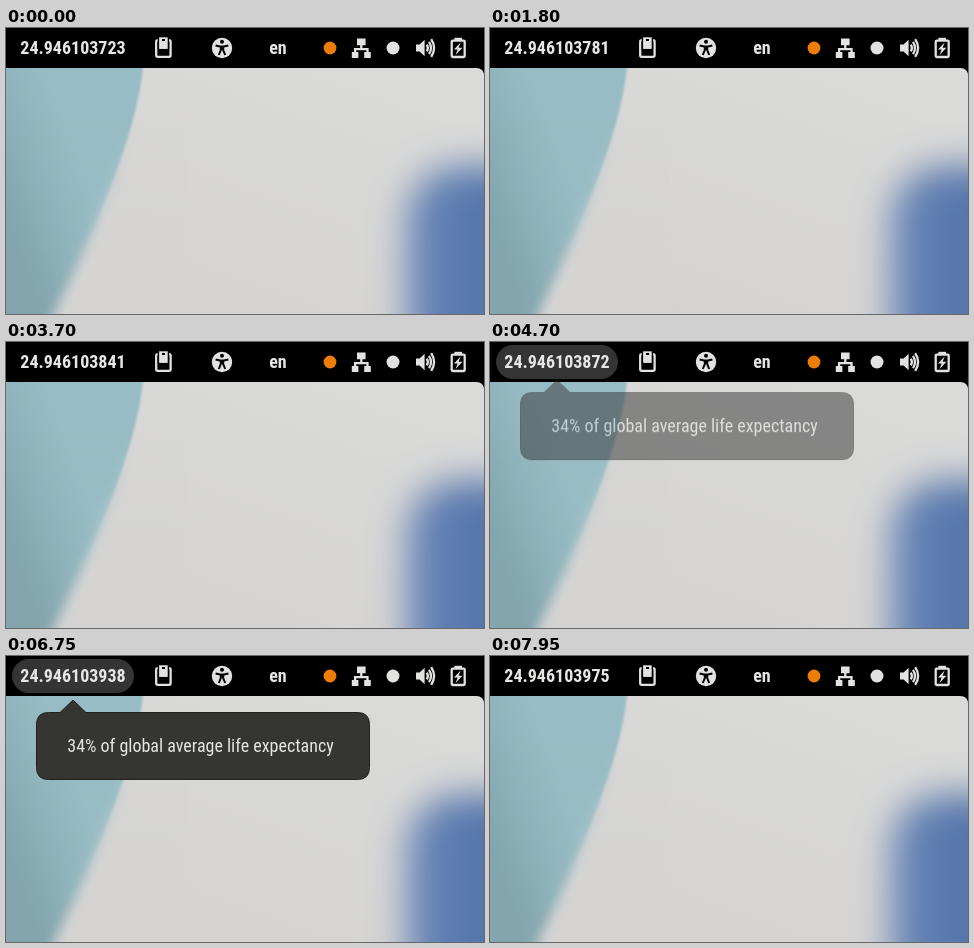
These frames come from a looping animation (478 by 286 pixels, 8000 ms). An HTML page:

```html
<!DOCTYPE html>
<html lang="en">
<head>
<meta charset="utf-8">
<title>Panel age counter</title>
<style>
  html, body { margin: 0; width: 100%; height: 100%; overflow: hidden; background: #000; }
  svg { display: block; width: 478px; height: 286px; }
  text {
    font: 18px "Roboto Condensed", Roboto, sans-serif;
    font-stretch: 75%;
    text-anchor: middle;
    fill: #e6e6e5;
  }
  .bold { font-weight: 700; }
  .icons { fill: #e2e2e1; }
  .line { fill: none; stroke: #e2e2e1; stroke-width: 2.3; }
  .cut { fill: none; stroke: #000; }
  #hover { opacity: 0; animation: hover 8s linear infinite; }
  #popup { opacity: 0; animation: popup 8s linear infinite; }
  @keyframes hover {
    0%, 49.375% { opacity: 0; }
    51.25%, 91.25% { opacity: 1; }
    93.125%, 100% { opacity: 0; }
  }
  @keyframes popup {
    0%, 57.8125% { opacity: 0; transform: translateY(-12px); }
    59.6875%, 89.375% { opacity: 1; transform: none; }
    91.25%, 100% { opacity: 0; transform: translateY(-12px); }
  }
</style>
</head>
<body>
<svg viewBox="0 0 478 286">
  <defs>
    <linearGradient id="paper" x1="1" y1="0" x2="0.3" y2="1">
      <stop offset="0" stop-color="#dbdbda"/>
      <stop offset="1" stop-color="#d4d3d2"/>
    </linearGradient>
    <linearGradient id="teal" gradientUnits="userSpaceOnUse" x1="0" y1="180" x2="80" y2="150">
      <stop offset="0" stop-color="#84a5ae"/>
      <stop offset="0.5" stop-color="#8fb3bc"/>
      <stop offset="1" stop-color="#98bcc5"/>
    </linearGradient>
    <linearGradient id="blue" gradientUnits="userSpaceOnUse" x1="400" y1="0" x2="478" y2="0">
      <stop offset="0" stop-color="#6b88b9"/>
      <stop offset="1" stop-color="#5474aa"/>
    </linearGradient>
    <linearGradient id="fade" x1="0" y1="0" x2="0" y2="1">
      <stop offset="0.2" stop-color="#000"/>
      <stop offset="0.75" stop-color="#fff"/>
    </linearGradient>
    <mask id="lower"><rect y="40" width="478" height="246" fill="url(#fade)"/></mask>
    <filter id="sharp" x="-20%" y="-20%" width="140%" height="140%"><feGaussianBlur stdDeviation="1.3"/></filter>
    <filter id="soft" x="-20%" y="-20%" width="140%" height="140%"><feGaussianBlur stdDeviation="6"/></filter>
    <filter id="haze" x="-50%" y="-50%" width="200%" height="200%"><feGaussianBlur stdDeviation="18"/></filter>
    <clipPath id="desk"><path d="M0 40H470Q478 40 478 48V286H0Z"/></clipPath>
    <path id="leaf" d="M-40 0H140Q139 30 137 40C130 108 90 200 48 286L30 330H-40Z"/>
  </defs>

  <rect width="478" height="286"/>
  <g clip-path="url(#desk)">
    <rect y="40" width="478" height="246" fill="url(#paper)"/>
    <use href="#leaf" fill="url(#teal)" filter="url(#sharp)"/>
    <g mask="url(#lower)">
      <rect y="40" width="180" height="246" fill="#d5d4d3"/>
      <use href="#leaf" fill="url(#teal)" filter="url(#soft)"/>
    </g>
    <rect x="401" y="139" width="190" height="260" rx="52" fill="url(#blue)" filter="url(#haze)"/>
  </g>

  <rect id="hover" x="6" y="3" width="122" height="34" rx="17" fill="#343434"/>
  <text id="age" class="bold" x="67" y="26">24.946103723</text>
  <text class="bold" x="272" y="26">en</text>

  <g class="icons">
    <!-- clipboard -->
    <rect class="line" x="150.2" y="12.2" width="14.4" height="16.6" rx="1.6"/>
    <rect x="152.4" y="8.6" width="10" height="13" stroke="#000" stroke-width="1.4"/>
    <rect x="154" y="10" width="6.8" height="10.6" rx="1"/>
    <rect x="156" y="11" width="3" height="2" fill="#000"/>
    <!-- accessibility -->
    <circle cx="216" cy="20" r="10.2"/>
    <circle cx="216" cy="13.7" r="2" fill="#000"/>
    <path class="cut" d="M209.6 17.4L214 18.4H218L222.4 17.4" stroke-width="2"/>
    <path class="cut" d="M216 18V22M214.8 18.5V22L212.8 27M217.2 18.5V22L219.2 27" stroke-width="2"/>
    <circle cx="324" cy="20" r="6.4" fill="#ed7d04"/>
    <!-- wired network -->
    <path d="M351 10.6h8.6v6.6h-8.6zM345.8 24h6.6v6h-6.6zM358.2 24h6.6v6h-6.6z"/>
    <path class="line" d="M355.3 17V21.2M349.1 25V21.2H361.5V25" stroke-width="1.8"/>
    <circle cx="387" cy="20" r="6.5"/>
    <!-- volume -->
    <path d="M410 16.6h3.6l5-4.8v16.4l-5-4.8h-3.6z"/>
    <path class="line" d="M420.8 16.6Q423 20 420.8 23.4M423 13.8Q427 20 423 26.2M425.2 11.2Q431 20 425.2 28.8" stroke-width="1.8"/>
    <!-- battery -->
    <path d="M448.4 9.8h7.6v3h-7.6z"/>
    <rect class="line" x="445.7" y="12.6" width="13" height="16.4" rx="1"/>
    <path d="M454.6 14.4L448 21.4h3.6L449.6 27l6.8-7.2h-3.8z"/>
  </g>

  <g id="popup">
    <path d="M42.5 56.5H54L67 44L80 56.5H351.5Q363.5 56.5 363.5 68.5V111.5Q363.5 123.5 351.5 123.5H42.5Q30.5 123.5 30.5 111.5V68.5Q30.5 56.5 42.5 56.5Z"
      fill="#353534" stroke="#20201f"/>
    <text x="194.5" y="96">34% of global average life expectancy</text>
  </g>
</svg>
<script>
  const LOOP = 8000, STEP = 50;
  // [time in ms, last three digits]; the clock drifts slightly between them
  const ticks = [[0, 723], [950, 754], [2700, 809], [3700, 841], [4700, 872], [6750, 938], [7950, 975], [8000, 977]];
  const age = document.getElementById('age');
  let start;

  function digitsAt(time) {
    const i = ticks.findIndex(([t]) => t > time);
    const [t0, v0] = ticks[i - 1], [t1, v1] = ticks[i];
    return Math.round(v0 + (v1 - v0) * (time - t0) / (t1 - t0));
  }

  function draw(now) {
    start ??= now;
    const time = Math.floor(((now - start + 3) % LOOP) / STEP) * STEP;
    age.textContent = '24.946103' + digitsAt(time);
    requestAnimationFrame(draw);
  }
  requestAnimationFrame(draw);
</script>
</body>
</html>
```
